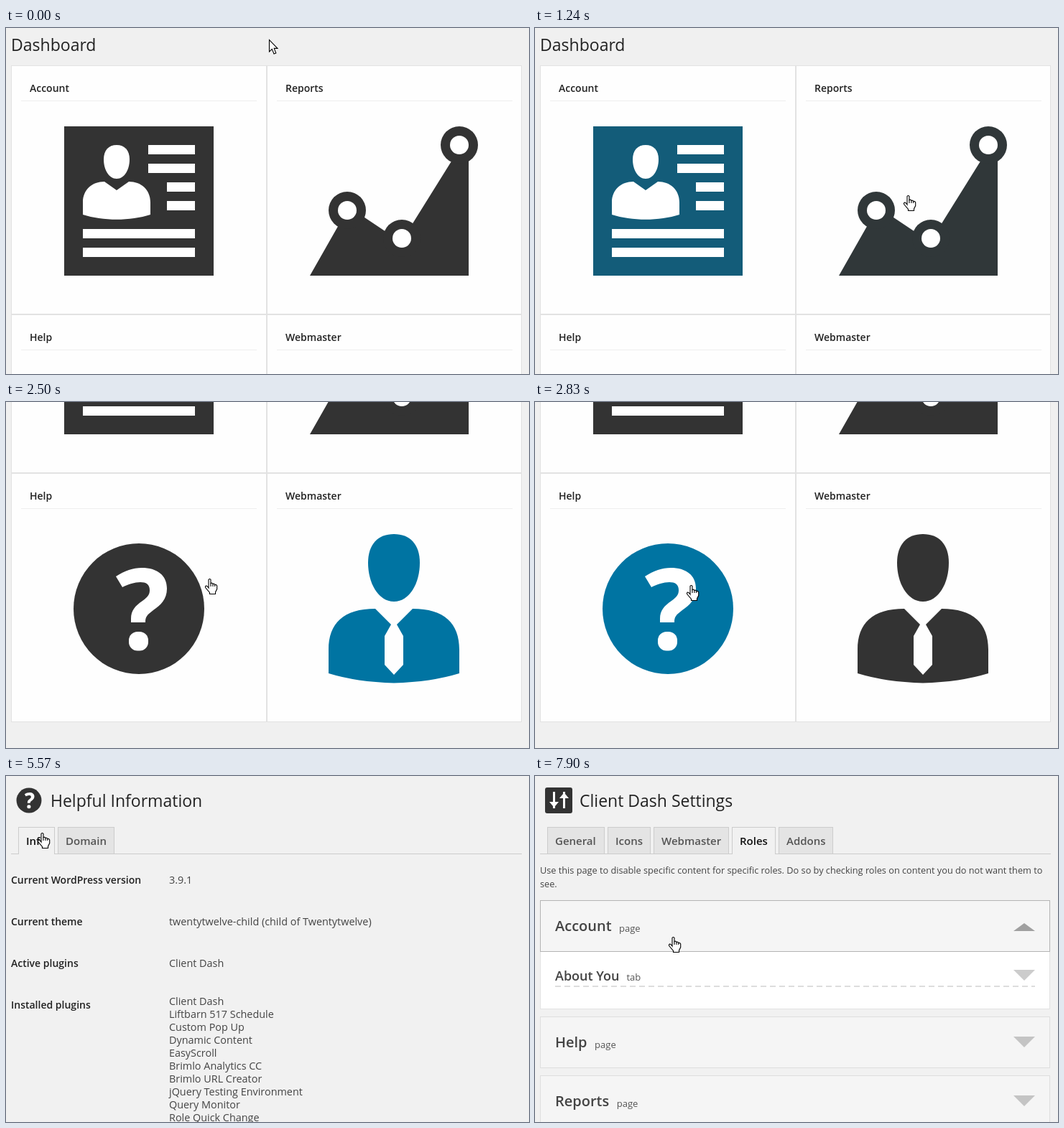
Recreate the animation shown at these times as an HTML page with a canvas. Size 728 px wide and 482 px high, loop 7.99 s.

```html
<!DOCTYPE html>
<html lang="en">
<head>
<meta charset="utf-8">
<title>Dashboard tour</title>
<style>
html, body { margin: 0; width: 728px; height: 482px; overflow: hidden; background: #f0f0f0; }
canvas { display: block; }
</style>
</head>
<body>
<canvas id="stage" width="728" height="482"></canvas>
<script>
const c = document.getElementById('stage').getContext('2d');
const LOOP = 7990, FADE = 185;
const DARK = [51, 51, 51], BLUE = [0, 116, 162];

// bursts of movement: start, end, number of steps
const bursts = [
  [270, 800, 7], [1070, 1420, 5], [1660, 2020, 5], [2320, 2830, 7], [2990, 3080, 2],
  [3920, 4530, 8], [4900, 5140, 4], [5570, 6060, 7], [6530, 6620, 2], [6800, 7440, 8], [7810, 7900, 2]
];

// pointer path: time, x, y
const path = [
  [0, 366, 16], [270, 412, 48], [358, 446, 74], [535, 290, 190], [720, 238, 240],
  [1070, 262, 240], [1157, 350, 236], [1245, 519, 233], [1420, 577, 249],
  [2240, 577, 249], [2405, 440, 248], [2490, 283, 246], [2660, 217, 255],
  [3925, 217, 255], [4350, 118, 98], [4443, 113, 84], [4820, 113, 84], [5140, 48, 81],
  [5490, 48, 81], [5570, 50, 79], [5978, 136, -8], [6060, 136, -40],
  [6700, 136, -40], [6800, 120, 85], [7160, 180, 200], [7440, 192, 224]
];

const clamp = v => Math.max(0, Math.min(1, v));
const mix = (a, b, k) => a + (b - a) * k;
const within = (v, a, b) => v >= a && v < b;

function snap(t) {
  let q = 0;
  for (const [a, b, n] of bursts) {
    if (t < a) break;
    const d = (b - a) / (n - 1);
    q = a + Math.min(n - 1, Math.floor((t - a) / d + 0.1)) * d;
  }
  return q;
}

function overLink(t, x, y) {
  if (t < 4000) return within(x % 356, 32, 339) && within(y, 112, 420);
  return within(y, 71, 109) || t > 6620 && within(y, 173, 245);
}

function pointerAt(t) {
  let i = 0;
  while (i < path.length - 1 && path[i + 1][0] <= t) i++;
  const p = path[i], n = path[i + 1] || p;
  const k = n === p ? 0 : (t - p[0]) / (n[0] - p[0]);
  const x = Math.round(mix(p[1], n[1], k)), y = Math.round(mix(p[2], n[2], k));
  return { x, y, hand: overLink(t, x, y) };
}

function tint(t, on, off) {
  const k = clamp((t - on) / FADE) - clamp((t - off) / FADE);
  return `rgb(${DARK.map((v, i) => Math.round(mix(v, BLUE[i], k)))})`;
}

function text(s, x, y, size, color, weight = 400) {
  c.font = `${weight} ${size}px "Open Sans", sans-serif`;
  c.fillStyle = color;
  c.fillText(s, x, y);
  return c.measureText(s).width;
}

function rect(x, y, w, h, color) {
  c.fillStyle = color;
  c.fillRect(x, y, w, h);
}

function box(x, y, w, h, fill, line) {
  rect(x, y, w, h, line);
  rect(x + 1, y + 1, w - 2, h - 2, fill);
}

function shape(points, color) {
  c.beginPath();
  points.forEach(p => c.lineTo(p[0], p[1]));
  c.closePath();
  c.fillStyle = color;
  c.fill();
}

function disc(x, y, r, color) {
  c.beginPath();
  c.arc(x, y, r, 0, 7);
  c.fillStyle = color;
  c.fill();
}

function svg(p, color) {
  c.fillStyle = color;
  c.fill(p);
}

function at(x, y, scale, draw) {
  c.save();
  c.translate(x, y);
  c.scale(scale, scale);
  draw();
  c.restore();
}

// head is centred on x with its top at 0, half a suit ends at the middle line
const head = new Path2D('M0 0C11 0 18 7 18 20C18 34 11 47 0 47C-11 47 -18 34 -18 20C-18 7 -11 0 0 0Z');
const bust = new Path2D('M-47 46V29C-47 11 -34 0 -17 0L0 12L17 0C34 0 47 11 47 29V46C19 55 -19 55 -47 46Z');
const halfSuit = new Path2D('M-91 90V57C-91 20 -70 0 -26 0L-4 22L-13 38V78L0 92V103.5Q-52 102 -91 90Z');
const query = new Path2D('M153 243C165 235 177 231 189 231C210 231 224 241 224 260C224 275 215 283 205 290C196 297 194 299 194 307H174V302C174 290 180 284 190 277C198 271 200 268 200 262C200 254 195 251 187 251C179 251 170 254 162 258Z');
const hand = new Path2D('M5 1.5Q6.5 -.5 8 1.5V6.5Q9.8 5.5 11 7.5Q12.6 6.5 13.7 8.5Q15.7 7.8 16.7 10V14.5L14.5 19V21.5H6.5V19.5L1 13Q-.3 11 1.5 10Q3 9.8 5 13Z');
const knuckles = new Path2D('M8 6.5V11M11 7.5V11M13.7 8.5V11');
const arrow = new Path2D('M.5 .5V17L4.3 13.4L7 20L9.8 19L7.2 12.4H12Z');

function accountIcon(color) {
  rect(81, 137, 208, 208, color);
  at(154, 163, 1, () => svg(head, '#fff'));
  at(154, 214, 1, () => svg(bust, '#fff'));
  for (let i = 0; i < 4; i++) {
    const w = i < 2 ? 65 : 39;
    rect(263 - w, 163 + 26 * i, w, 13, '#fff');
  }
  rect(107, 280, 156, 13, '#fff');
  rect(107, 306, 156, 13, '#fff');
}

function reportIcon(color) {
  shape([[423, 345], [473, 257], [485, 254.5], [550, 298], [631, 168], [644, 168], [644, 345]], color);
  for (const [x, y] of [[475, 254], [551, 293], [631, 163]]) {
    disc(x, y, 26, color);
    disc(x, y, 13, '#fff');
  }
}

function helpIcon(color) {
  disc(185, 288, 91, color);
  svg(query, '#fff');
  c.beginPath();
  c.roundRect(171, 320, 27, 26.5, 12);
  c.fill();
}

function masterIcon(color) {
  at(540, 184, 2, () => svg(head, color));
  at(540, 288, 1, () => {
    svg(halfSuit, color);
    c.scale(-1, 1);
    svg(halfSuit, color);
  });
}

function card(x, y, w, title) {
  box(x, y, w, 347, '#fefefe', '#e2e2e2');
  text(title, x + 26, y + 37, 14, '#222', 600);
  rect(x + 14, y + 49, 328, 1, '#eee');
}

function dashboard(t) {
  const scroll = t < 1660 ? 0 : t < 1750 ? 200 : 300;
  at(0, -scroll, 1, () => {
    text('Dashboard', 7, 32, 23, '#222');
    card(7, 52, 356, 'Account');
    card(363, 52, 355, 'Reports');
    card(7, 399, 356, 'Help');
    card(363, 399, 355, 'Webmaster');
    accountIcon(tint(t, 530, 1177));
    reportIcon(tint(t, 1235, 1755));
    c.translate(0, 300);
    helpIcon(tint(t, 2495, LOOP));
    masterIcon(tint(t, 1755, 2495));
    if (t >= 2990) {
      c.globalAlpha = t < 3080 ? 0.5 : 1;
      c.strokeStyle = '#5b9dd9';
      c.lineWidth = 1;
      c.shadowColor = 'rgba(30,140,190,.8)';
      c.shadowBlur = 3;
      c.strokeRect(34.5, 161.5, 301, 257);
    }
  });
}

function tabs(list, active, p) {
  rect(7, 108, 711, 1, '#ccc');
  for (const [name, x, w] of list) {
    const on = name === active;
    const over = within(p.x, x, x + w) && within(p.y, 71, 109);
    box(x, 71, w, 38, on ? '#f1f1f1' : over ? '#fff' : '#e4e4e4', '#ccc');
    if (on) rect(x + 1, 108, w - 2, 1, '#f1f1f1');
    text(name, x + 11, 96, 15, on ? '#111' : over ? '#464646' : '#555', 600);
  }
}

function info(p) {
  at(32, 34, 0.192, () => at(-185, -288, 1, () => helpIcon('#333')));
  text('Helpful Information', 62, 43, 23, '#222');
  tabs([['Info', 17, 51], ['Domain', 72, 79]], 'Info', p);
  [['Current WordPress version', '3.9.1'],
   ['Current theme', 'twentytwelve-child (child of Twentytwelve)'],
   ['Active plugins', 'Client Dash'],
   ['Installed plugins', '']].forEach(([label, value], i) => {
    text(label, 7, 150 + 58 * i, 14, '#222', 600);
    text(value, 227, 150 + 58 * i, 14.4, '#444');
  });
  ['Client Dash', 'Liftbarn 517 Schedule', 'Custom Pop Up', 'Dynamic Content', 'EasyScroll', 'Brimlo Analytics CC',
   'Brimlo URL Creator', 'jQuery Testing Environment', 'Query Monitor', 'Role Quick Change']
    .forEach((s, i) => text(s, 227, 319 + 18 * i, 14.4, '#444'));
}

function caret(base, tip, color) {
  shape([[666, base], [696, base], [681, tip]], color);
}

function slider(x, y, dir) {
  rect(x - 1.5, 22, 3, 23, '#fff');
  shape([[x - 6.5, y], [x + 6.5, y], [x + 1.5, y + 6 * dir], [x - 1.5, y + 6 * dir]], '#fff');
}

function settingsIcon() {
  c.beginPath();
  c.roundRect(14, 16, 38, 36, 3);
  c.fillStyle = '#333';
  c.fill();
  slider(26.5, 36, 1);
  slider(40.5, 31, -1);
}

function settings(t, p) {
  settingsIcon();
  text('Client Dash Settings', 62, 43, 23, '#222');
  tabs([['General', 17, 80], ['Icons', 101, 60], ['Webmaster', 165, 105], ['Roles', 274, 61], ['Addons', 339, 76]], 'Roles', p);
  text('Use this page to disable specific content for specific roles. Do so by checking roles on content you do not want them to', 7, 136, 12.73, '#444');
  text('see.', 7, 155, 12.73, '#444');

  const open = clamp((t - 7750) / 150);
  const over = within(p.y, 173, 245);
  if (open) {
    c.save();
    c.beginPath();
    c.rect(0, 245, 728, 80 * open);
    c.clip();
    box(7, 244, 710, 81, '#fff', '#e2e2e2');
    const w = text('About You', 28, 285, 18, '#444', 600);
    text('tab', 38 + w, 285, 13, '#555');
    caret(270, 285, '#ccc');
    c.setLineDash([8, 5]);
    c.strokeStyle = '#ddd';
    c.lineWidth = 2;
    c.beginPath();
    c.moveTo(28, 293);
    c.lineTo(696, 293);
    c.stroke();
    c.restore();
  }
  ['Account', 'Help', 'Reports', 'Webmaster'].forEach((name, i) => {
    const first = i === 0, lit = first && over;
    const y = 173 + 82 * i + (first ? 0 : 80 * open);
    box(7, y, 710, 72, '#f5f5f5', lit ? '#b4b4b4' : '#dedede');
    const w = text(name, 28, y + 43, 20, '#444', 600);
    text('page', 38.5 + w, y + 44, 13, '#555');
    const k = first ? open : 0;
    caret(y + mix(28, 43, k), y + mix(43, 32, k), lit ? '#a0a0a0' : '#c4c4c4');
  });
}

function pointer(p) {
  at(p.hand ? p.x - 6 : p.x, p.y, 1, () => {
    const body = p.hand ? hand : arrow;
    c.lineWidth = 1.1;
    c.strokeStyle = '#000';
    svg(body, '#fff');
    c.stroke(body);
    if (p.hand) c.stroke(knuckles);
  });
}

function draw(now) {
  const t = snap(now % LOOP), p = pointerAt(t);
  const blank = within(t, 3920, 4000) || within(t, 6530, 6620);
  rect(0, 0, 728, 482, t < 4000 ? '#f0f0f0' : '#f1f1f1');
  if (!blank) {
    if (t < 3920) dashboard(t);
    else if (t < 6530) info(p);
    else settings(t, p);
  }
  pointer(p);
}

let start;
function frame(now) {
  if (start === undefined) start = now;
  draw(now - start);
  requestAnimationFrame(frame);
}
requestAnimationFrame(frame);
</script>
</body>
</html>
```
